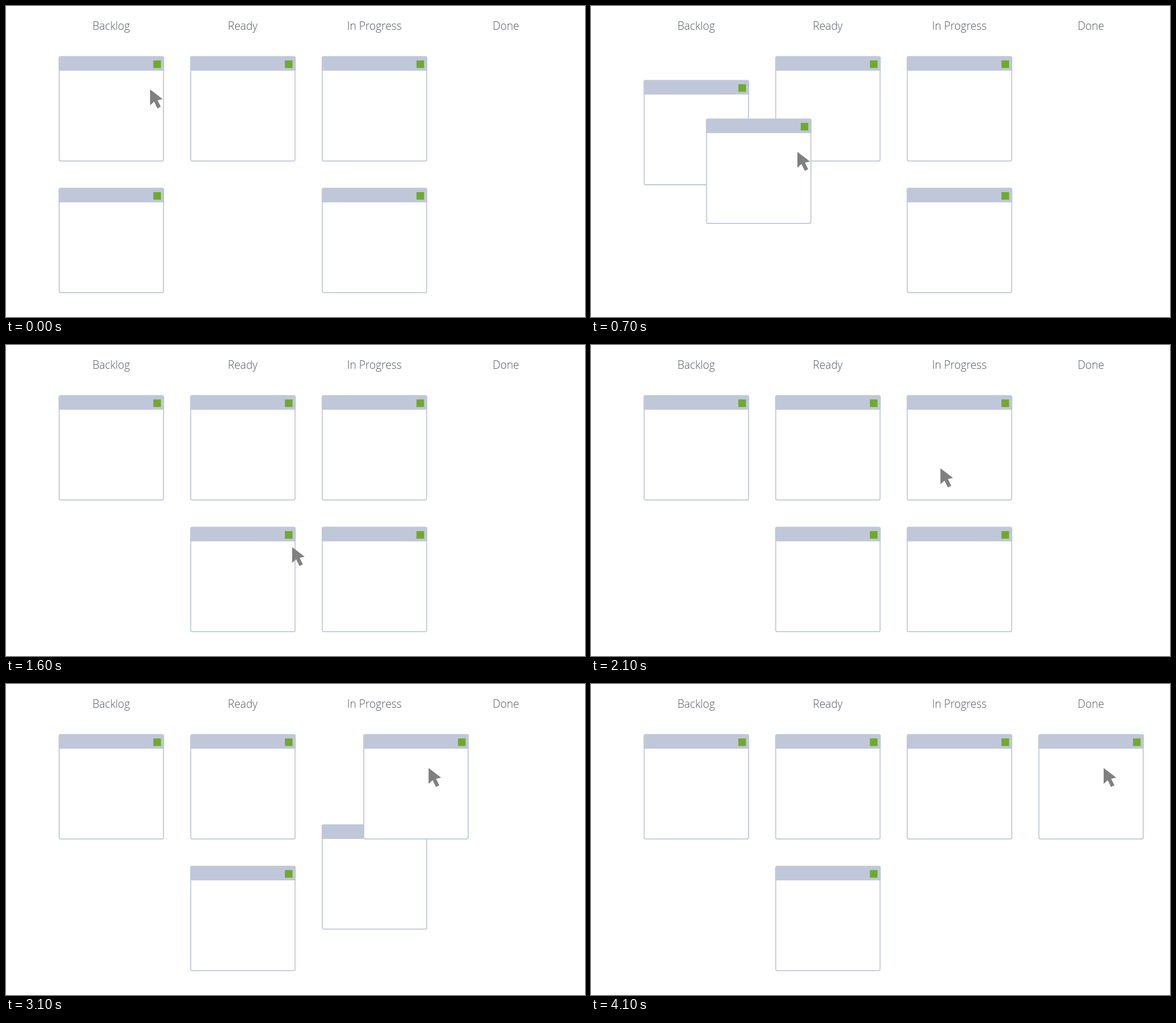
An HTML page for the animation above (5.3 s loop, 1021 by 548 pixels).

```html
<!DOCTYPE html>
<html lang="en">
<head>
<meta charset="utf-8">
<title>Kanban board</title>
<style>
  html, body { margin: 0; width: 100%; height: 100%; overflow: hidden; background: #fff; }
  svg { display: block; width: 1021px; height: 548px; }
  text { font: 300 19.2px "Open Sans", sans-serif; fill: #50555c; text-anchor: middle; }
</style>
</head>
<body>
<svg viewBox="0 0 1021 548">
  <defs>
    <g id="card">
      <rect x=".9" y=".9" width="184" height="183.6" rx="2.5" fill="#fff" stroke="#c0c7d9" stroke-width="1.8"/>
      <path d="M0 25.5V3Q0 0 3 0H183Q186 0 186 3V25.5Z" fill="#c0c7d9"/>
      <rect x="167" y="7.3" width="13.4" height="13.4" fill="#6fab2b"/>
    </g>
  </defs>
  <text x="185.5" y="42">Backlog</text>
  <text x="417.5" y="42">Ready</text>
  <text x="649.5" y="42">In Progress</text>
  <text x="881.5" y="42">Done</text>
  <use href="#card" x="324.8" y="88.6"/>
  <use href="#card" id="backlogNext"/>
  <use href="#card" id="progressNext"/>
  <use href="#card" id="toReady"/>
  <use href="#card" id="toDone"/>
  <path id="cursor" fill="#808080" d="M0 0V28L7.2 21.6L13 33.6L19 30.6L13.2 19L22.2 17Z"/>
</svg>
<script>
  const LOOP = 5300, TICK = 100;
  const COL = [92.8, 324.8, 556.8, 788.8], ROW = [88.6, 320.6];

  // Each stop is [time in ms, x, y]; motion is linear between stops.
  const DRAG_BEND = 0.474;
  const drag = (x, y) => [
    [185, x, y],
    [700, x + 232 * DRAG_BEND, y + 232 * DRAG_BEND],
    [1090, x + 232, y + 232],
  ];
  const tracks = {
    toReady: drag(COL[0], ROW[0]),
    backlogNext: [[187, COL[0], ROW[1]], [813, COL[0], ROW[0]]],
    toDone: [[2900, COL[2], ROW[0]], [3534, COL[3], ROW[0]]],
    progressNext: [[2900, COL[2], ROW[1]], [3534, COL[2], ROW[0]]],
    cursor: [
      ...drag(254, 147),
      [1517, 486, 379], [2350, 672, 148],
      [2900, 672, 148], [3534, 904, 148],
    ],
  };

  function positionAt(stops, time) {
    const next = stops.findIndex(stop => stop[0] > time);
    if (next === 0) return stops[0].slice(1);
    if (next < 0) return stops[stops.length - 1].slice(1);
    const [t0, x0, y0] = stops[next - 1], [t1, x1, y1] = stops[next];
    const p = (time - t0) / (t1 - t0);
    return [x0 + (x1 - x0) * p, y0 + (y1 - y0) * p];
  }

  const start = performance.now();
  function draw() {
    const elapsed = Math.max(0, performance.now() - start) % LOOP;
    const time = Math.floor(elapsed / TICK) * TICK;
    for (const [id, stops] of Object.entries(tracks)) {
      const [x, y] = positionAt(stops, time);
      document.getElementById(id).setAttribute("transform", `translate(${x} ${y})`);
    }
    requestAnimationFrame(draw);
  }
  draw();
</script>
</body>
</html>
```
